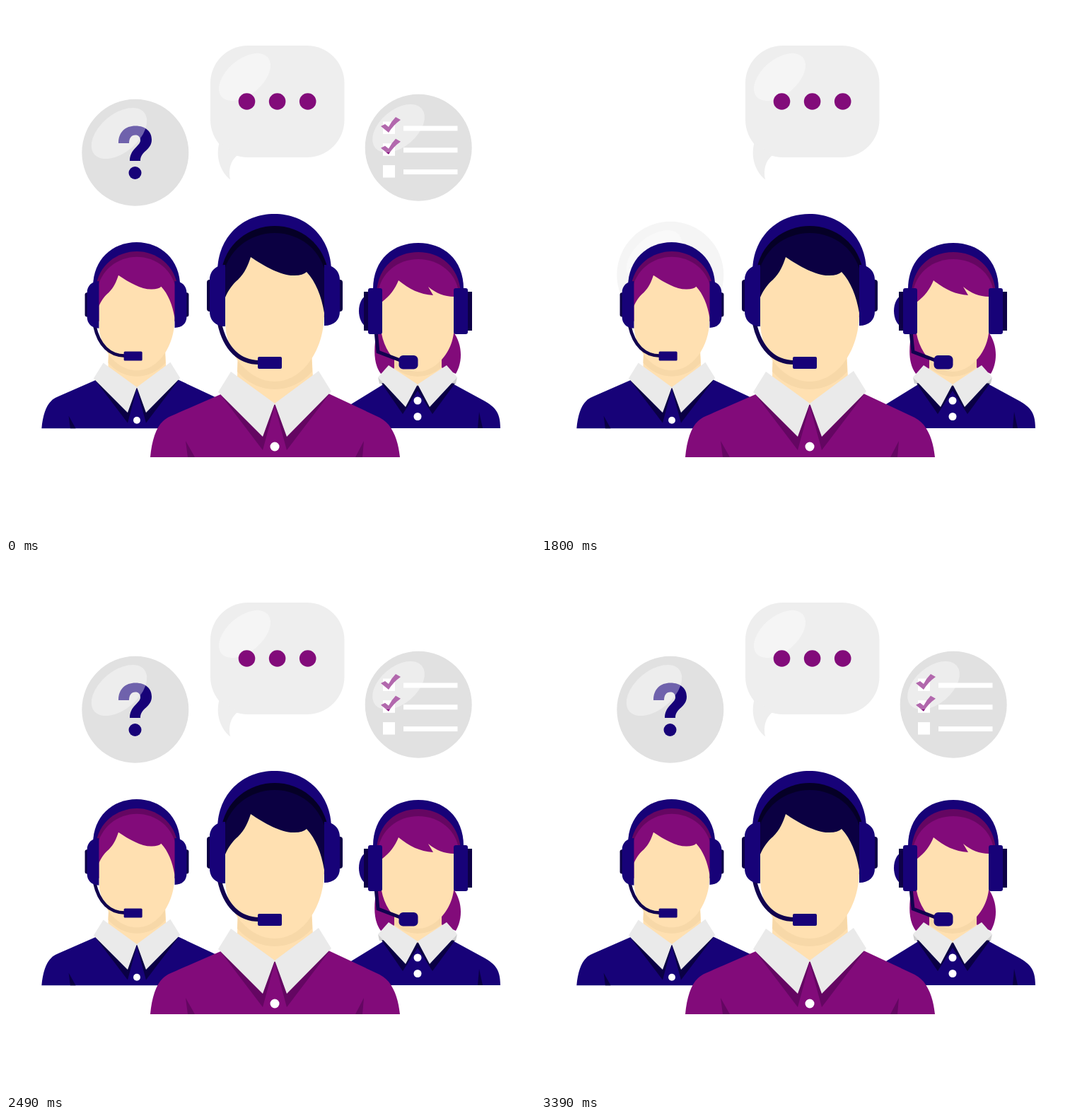
These frames come from a looping animation (748x748 px, 4500 ms). An HTML page:

```html
<!DOCTYPE html>
<html lang="en">
<head>
<meta charset="utf-8">
<title>Support team</title>
<style>
  html, body { margin: 0; width: 100%; height: 100%; overflow: hidden; background: #fff; }
  svg { display: block; width: 100vw; height: 100vh; }
  .bubble { transform-box: fill-box; transform-origin: center; }
  .navy { fill: #170278; }
  .deep { fill: #0d0046; }
  .purple { fill: #820b7a; }
  .skin { fill: #ffe0b1; }
  .chin { fill: #f7d8a8; }
  .collar { fill: #eaeaea; }
  .white { fill: #fff; }
  .disc { fill: #e1e1e1; }
  .speech { fill: #eee; }
  .gloss { fill: #fff; opacity: .38; }
  .wire { fill: none; stroke: #11024f; stroke-width: 6; }
  .shirt { fill: var(--shirt); }
  .fold { fill: var(--fold); }
  .hair { fill: var(--hair); }
  .shade { fill: var(--shade); }
  .lead { --shirt: #820b7a; --fold: #640662; --hair: #0b0042; --shade: #050026; }
  .mate { --shirt: #170278; --fold: #0a0044; --hair: #820b7a; --shade: #650662; }
</style>
</head>
<body>
<svg viewBox="0 0 748 748">
  <defs>
    <g id="man">
      <path class="shirt" d="M204 638C206 615 212 596 222 587C228 581 236 579 244 575L306 548H456L522 579Q534 584 541 592C551 605 555 620 557 638Z"/>
      <path class="fold" d="M254 615L267 638H257ZM506 615L504 638H494ZM303 549L363 628L380 565L397 628L457 549Z"/>
      <path class="skin" d="M328 485L327 526L380 564L434 526L432 485Z"/>
      <path class="chin" d="M328 498L327 517Q350 542 380 542Q410 542 433 517L432 498Z"/>
      <path class="collar" d="M318 517L380 562L363 609L300 546ZM442 516L380 562L397 609L460 545Z"/>
      <path class="navy" d="M299 376C299 326 335 294 379.500 294C424 294 460 326 460 376V400H299Z"/>
      <path class="shade" d="M304 410V380C308 335 345 311 380 311C415 311 451 335 456 380V410Z"/>
      <path class="hair" d="M306 420V385C312 345 345 321 380 321C415 321 448 345 453 385V440H306Z"/>
      <path class="skin" d="M310 412C315 400 322 392 328 387C338 377 342 367 346 355C365 368 390 382 408 381Q420 381 425 376C438 390 446 410 450 434C450 490 417 531 380 531C343 531 310 492 310 445Z"/>
      <rect class="deep" x="284" y="387" width="12" height="45" rx="4"/>
      <rect class="deep" x="464" y="387" width="12" height="45" rx="4"/>
      <path class="wire" d="M302 449C310 485 330 504 358 504"/>
      <path class="navy" d="M310 366V453C296 453 288 444 288 432V387C288 375 297 366 310 366ZM450 366V452C464 452 472 444 472 432V387C472 375 463 366 450 366Z"/>
      <rect class="navy" x="356" y="496" width="34" height="17" rx="2"/>
      <circle class="white" cx="380" cy="623" r="6.500"/>
    </g>
    <path id="check" class="purple" d="M530 170L536 167L541 171Q545 163 551 157L558 161Q548 168 541 179Z"/>
    <rect id="box" class="white" x="533" y="163.500" width="17" height="17.500"/>
    <rect id="line" class="white" x="562" y="169.500" width="76.500" height="7"/>
  </defs>

  <g class="bubble" id="question">
    <circle class="disc" cx="182.800" cy="207.300" r="75.500"/>
    <path class="navy" d="M159 194C159 178 169 169.500 183 169.500C198 169.500 206 178 206 189C206 204 190 205 190 219H175C175 202 190 198 190 190C190 185 187 182.500 183 182.500C177 182.500 174 187 174 194Z"/>
    <circle class="navy" cx="182.500" cy="236" r="9"/>
    <ellipse class="gloss" rx="46" ry="27" transform="translate(160 180) rotate(-40)"/>
  </g>

  <g class="bubble" id="speech">
    <rect class="speech" x="289" y="56" width="189.500" height="158" rx="53"/>
    <path class="speech" d="M302 192C296 212 302 233 317 245.500C314 230 318 219 327 211Z"/>
    <ellipse class="gloss" rx="43" ry="25" transform="translate(337.500 100.500) rotate(-40)"/>
    <g class="purple">
      <circle cx="340.500" cy="135" r="11.800"/>
      <circle cx="383.600" cy="135" r="11.800"/>
      <circle cx="426.700" cy="135" r="11.800"/>
    </g>
  </g>

  <g class="bubble" id="list">
    <circle class="disc" cx="583.200" cy="200.200" r="75.500"/>
    <use href="#box"/><use href="#box" y="30.800"/><use href="#box" y="61.600"/>
    <use href="#line"/><use href="#line" y="30.800"/><use href="#line" y="61.600"/>
    <use href="#check"/><use href="#check" y="30.800"/>
    <ellipse class="gloss" rx="43" ry="26" transform="translate(555 173) rotate(-40)"/>
  </g>

  <use href="#man" class="mate" transform="translate(-105.700 109.100) scale(.765)"/>

  <g class="mate">
    <path class="hair" d="M524 460C520 485 519 505 530 520L560 508V460ZM632 460C647 480 645 505 636 520L608 508Z"/>
    <path class="shirt" d="M466 597C467 580 474 570 488 563L540 531H626L672 556C690 566 699 572 699 597Z"/>
    <path class="fold" d="M669 574L674 597H667ZM530 532L561 577L582 544L603 577L636 532Z"/>
    <path class="skin" d="M549 480V515L582 537L616 515V480Z"/>
    <path class="chin" d="M549 500V511Q564 524 582 524Q600 524 616 511V500Z"/>
    <path fill="#cfcfcf" d="M526 525L528 534L536 533ZM638 525L636 534L628 533Z"/>
    <path class="collar" d="M541 508L582 535L565 567L526 525ZM623 508L582 535L599 567L638 525Z"/>
    <path class="navy" d="M519 400C519 358 548 335 583 335C618 335 647 358 647 400Z"/>
    <path class="shade" d="M524 405C526 368 552 348 583 348C614 348 640 368 643 405Z"/>
    <path class="hair" d="M526 430V405C530 378 553 358 583 358C613 358 637 378 640 405V430Z"/>
    <path class="skin" d="M531 419C543 410 550 400 555 388C570 400 585 408 604 409L597 397C608 406 620 411 633 411V463C629 494 605 517 582 517C559 517 536 492 531 463Z"/>
    <path class="navy" d="M514 408C494 410 494 452 514 455Z"/>
    <rect class="deep" x="506" y="404" width="10" height="55"/>
    <rect class="deep" x="649" y="404" width="10" height="55"/>
    <path class="wire" style="stroke-width:5" d="M523 460L526 489L560 502"/>
    <rect class="navy" x="512" y="399" width="20" height="65" rx="3"/>
    <rect class="navy" x="633" y="399" width="20" height="65" rx="3"/>
    <rect class="navy" x="555.500" y="494" width="27" height="19.500" rx="6"/>
    <circle class="white" cx="582" cy="558" r="5.500"/>
    <circle class="white" cx="582" cy="580.500" r="5.500"/>
  </g>

  <use href="#man" class="lead"/>
</svg>

<script>
  const LOOP = 4500, TICK = 30;

  // Each track lists [time in ms, value]; values advance once per tick.
  const bubbles = {
    speech: {
      opacity: [[1020, 0], [1050, .2], [1230, .95], [1260, 1]],
      rise: [[1230, 276], [1410, -27], [1470, 0]],
      pulse: [2940, 1.18]
    },
    question: {
      opacity: [[1740, 0], [1800, .33], [1860, 1]],
      rise: [[1800, 173], [1890, -21], [1920, 0]],
      pulse: [2670, 1.2]
    },
    list: {
      opacity: [[2160, 0], [2220, .36], [2340, 1]],
      rise: [[2280, 252], [2430, -36], [2490, 0]],
      pulse: [3210, 1.2]
    }
  };

  function play(el, prop, track, format = String) {
    const points = [...track, [LOOP, track[track.length - 1][1]]];
    const frames = points.map(([time, value], i) => {
      const next = points[i + 1];
      const ticks = next ? Math.round((next[0] - time) / TICK) : 1;
      return { offset: time / LOOP, [prop]: format(value), easing: `steps(${ticks}, end)` };
    });
    el.animate(frames, { duration: LOOP, iterations: Infinity });
  }

  for (const [id, { opacity, rise, pulse: [start, peak] }] of Object.entries(bubbles)) {
    const el = document.getElementById(id);
    play(el, 'opacity', [[0, 1], [120, 0], ...opacity]);
    play(el, 'translate', [[0, 0], [120, 0], [150, rise[0][1]], ...rise], y => `0px ${y}px`);
    play(el, 'scale', [[0, 1], [start, 1], [start + 90, peak], [start + 180, 1]]);
  }
</script>
</body>
</html>
```
